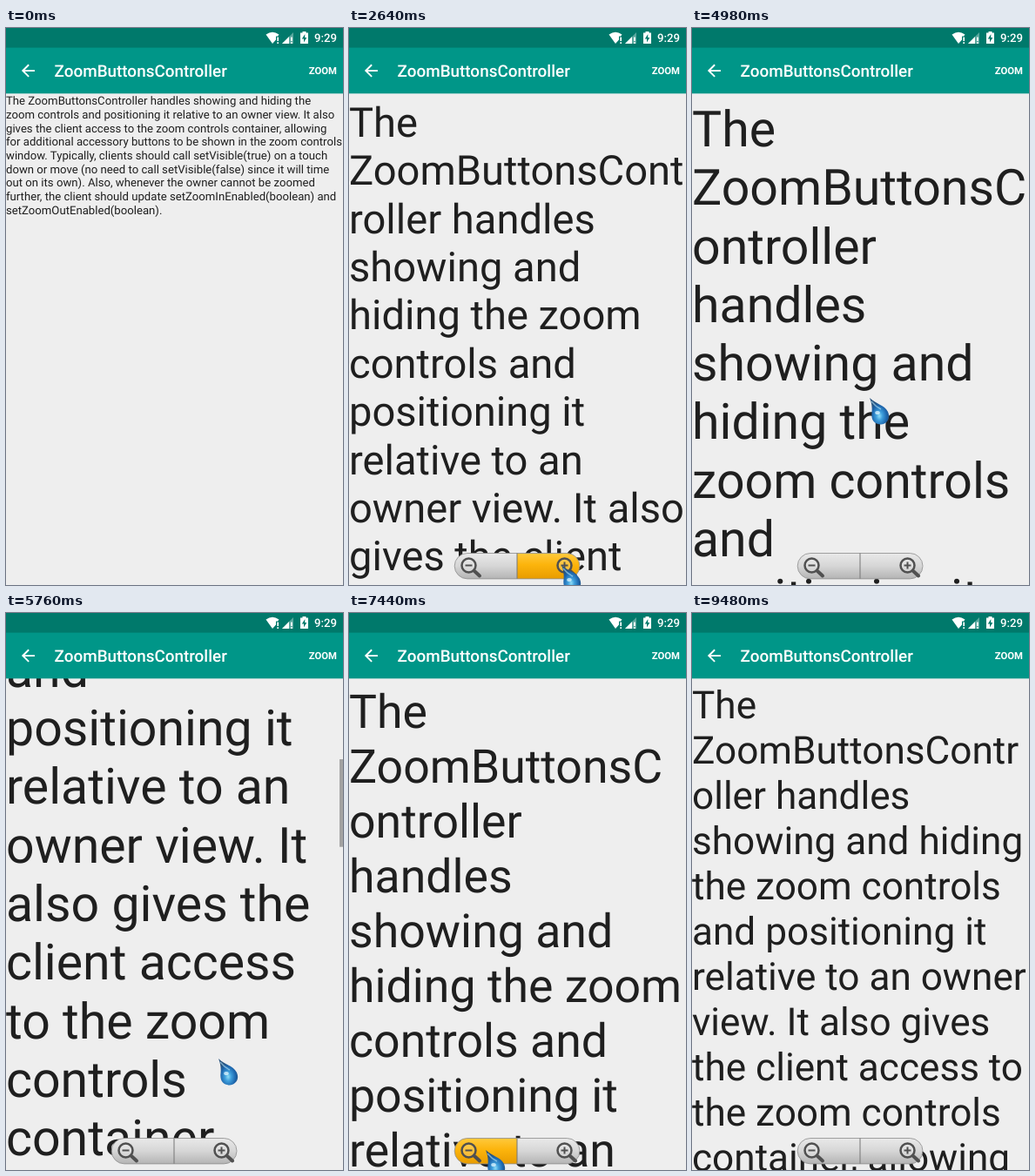
Recreate the animation shown at these times as an HTML page. Size 387 px wide and 640 px high, loop 9960 ms.

```html
<!DOCTYPE html>
<html lang="en">
<head>
<meta charset="utf-8">
<style>
  html, body { margin: 0; width: 100%; height: 100%; overflow: hidden; background: #eee; }
  body, svg { font-family: Roboto, sans-serif; text-rendering: geometricPrecision; }
  #view { position: absolute; left: 0; top: 75px; width: 387px; height: 565px; overflow: hidden; }
  #text {
    width: 387px; padding-top: calc(.129em + .7px); line-height: calc(1.172em + .2px);
    color: #1f1f1f; overflow-wrap: break-word;
  }
  svg { position: absolute; left: 0; top: 0; }
</style>
</head>
<body>
<div id="view"><div id="text">The ZoomButtonsController handles showing and hiding the
zoom controls and positioning it relative to an owner view. It also
gives the client access to the zoom controls container, allowing
for additional accessory buttons to be shown in the zoom controls
window. Typically, clients should call setVisible(true) on a touch
down or move (no need to call setVisible(false) since it will time
out on its own). Also, whenever the owner cannot be zoomed
further, the client should update setZoomInEnabled(boolean) and
setZoomOutEnabled(boolean).</div></div>

<svg width="387" height="640" viewBox="0 0 387 640">
  <defs>
    <linearGradient id="gray" x2="0" y2="1">
      <stop stop-color="#e9e9e9"/><stop offset=".5" stop-color="#d6d6d6"/><stop offset="1" stop-color="#b4b4b4"/>
    </linearGradient>
    <linearGradient id="amber" x2="0" y2="1">
      <stop stop-color="#ffc93c"/><stop offset=".45" stop-color="#fcb40c"/><stop offset="1" stop-color="#e89c00"/>
    </linearGradient>
    <radialGradient id="water" cx=".5" cy=".68" r=".55">
      <stop stop-color="#8edcf6"/><stop offset=".3" stop-color="#3f9fdc"/>
      <stop offset=".7" stop-color="#1d66ad"/><stop offset="1" stop-color="#27517c"/>
    </radialGradient>
    <g id="lens" fill="none" stroke="#505050">
      <path d="M6 6L12.5 12" stroke-width="4" stroke-linecap="round"/>
      <circle r="8" stroke-width="2.5" fill="#fff" fill-opacity=".2"/>
      <path d="M-4 0H4" stroke-width="2"/>
    </g>
  </defs>

  <rect id="bar" x="383" width="4" fill="#000" fill-opacity=".32"/>

  <!-- app bar and status bar -->
  <rect width="387" height="75.3" fill="#009688"/>
  <rect width="387" height="22.6" fill="#00796b"/>
  <circle id="ripple" cx="361" cy="49" fill="#fff"/>
  <g fill="#fff" font-weight="500">
    <path transform="translate(14.2 37.8) scale(.941)" d="M20 11H7.83l5.59-5.59L12 4l-8 8 8 8 1.41-1.41L7.83 13H20z"/>
    <text x="55.5" y="56" font-size="18.9">ZoomButtonsController</text>
    <text x="380" y="53.3" font-size="11.3" font-weight="700" text-anchor="end">ZOOM</text>
    <text x="380" y="16" font-size="13.2" text-anchor="end">9:29</text>
    <path d="M298.5 7.5Q306 2 313.5 7.5L312 9.5H310V13.5L306 18Z"/>
    <path d="M317 18L330 5V18Z" fill-opacity=".35"/>
    <path d="M317 18L325 10V18Z"/>
    <path d="M312.2 10.5V15M312.2 16.2V18M327.9 10.5V15M327.9 16.2V18" stroke="#fff" stroke-width="1.7"/>
    <path d="M338 5.5H340.5V4H344.5V5.5H347V18H338Z"/>
    <path d="M343.3 7L339.8 12.5H342V16.5L345.3 11H343.3Z" fill="#00796b"/>
  </g>

  <!-- zoom controls -->
  <g id="controls">
    <path id="out" d="M193 603.5H136a14.7 14.7 0 0 0 0 29.4H193Z"/>
    <path id="in" d="M193 603.5H250a14.7 14.7 0 0 1 0 29.4H193Z"/>
    <path d="M193 603V633" stroke="#777"/>
    <rect x="121.2" y="603.5" width="143.8" height="29.4" rx="14.7" fill="none" stroke="#8c8c8c" stroke-opacity=".8"/>
    <use href="#lens" x="137.5" y="617.5"/>
    <use href="#lens" x="247.5" y="617.5"/>
    <path d="M247.5 613.5v8" stroke="#505050" stroke-width="2"/>
  </g>

  <g id="drop">
    <path d="M0 0C7 7 17 8 21 16C25 25 18 31 12 30.5C5 30 1.5 25 2.5 17C3 11 2.5 6 0 0Z" fill="url(#water)"/>
    <path d="M2 4C6 9 9 11 13 13" fill="none" stroke="#b5e4f7" stroke-opacity=".6" stroke-width="1.5"/>
    <ellipse cx="9" cy="17" rx="2.8" ry="2" fill="#e2f7ff" fill-opacity=".75"/>
  </g>
</svg>

<script>
const LOOP = 9960, STEP = 60, VIEW = 565, HOLD = 130;
const el = id => document.getElementById(id);
const [text, bar, ripple, controls, drop] = ['text', 'bar', 'ripple', 'controls', 'drop'].map(el);

// button taps: zooming in speeds up, zooming out keeps a steady beat
const taps = {
  in: Array.from({ length: 7 }, (_, n) => 2040 + 646 * n - 46 * n * n),
  out: Array.from({ length: 8 }, (_, n) => 6840 + 300 * n)
};
// pointer moves: start, end, x, y
const moves = [
  [60, 600, 335, 50], [1260, 1800, 244, 617], [4440, 4980, 204, 425],
  [5040, 5760, 244, 512], [6180, 6660, 157, 617], [9060, 9420, 361, 75]
];

const ramp = (t, from, to) => Math.max(0, Math.min(1, (t - from) / (to - from)));
const smooth = p => p * p * (3 - 2 * p);
const released = (name, t) => taps[name].filter(s => t >= s + HOLD).length;

function pointer(t) {
  let x = 361, y = 75;
  for (const [from, to, x2, y2] of moves) {
    const p = smooth(ramp(t, from, to));
    x += (x2 - x) * p;
    y += (y2 - y) * p;
  }
  return [x, y];
}

function draw(t) {
  const zoomIns = released('in', t), level = zoomIns - released('out', t);
  const scroll = 577 * Math.sin(Math.PI * ramp(t, 5040, 6240)) ** 2;
  text.style.fontSize = (zoomIns ? 47.1 * 1.033 ** (level - 1) : 13.17) + 'px';
  text.style.whiteSpace = zoomIns ? 'normal' : 'pre';
  text.style.transform = `translateY(${-scroll}px)`;

  const range = text.offsetHeight;
  bar.setAttribute('y', 75 + scroll * VIEW / range);
  bar.setAttribute('height', VIEW * VIEW / range);
  bar.style.opacity = t < 5040 ? 0 : 1 - ramp(t, 6300, 6600);

  ripple.setAttribute('r', 26 * ramp(t, 1020, 1260));
  ripple.style.opacity = .22 * (1 - ramp(t, 1260, 1560));

  controls.style.opacity = ramp(t, 1200, 1440);
  for (const name in taps) {
    const down = taps[name].some(s => t >= s && t < s + HOLD);
    el(name).setAttribute('fill', `url(#${down ? 'amber' : 'gray'})`);
  }

  drop.setAttribute('transform', `translate(${pointer(t)})`);
  drop.style.display = t >= 60 && t < 9480 ? '' : 'none';
}

const start = performance.now();
function tick() {
  const t = (performance.now() - start) % LOOP;
  draw(Math.floor(t / STEP) * STEP);
  requestAnimationFrame(tick);
}
tick();
</script>
</body>
</html>
```
